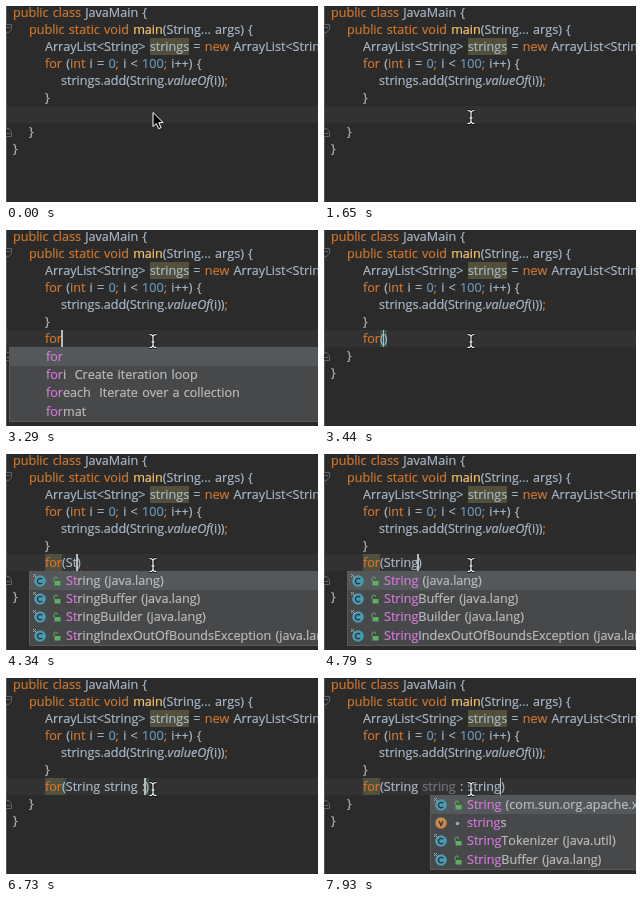
An HTML page for the animation above (8 s loop, 312 by 196 pixels).

```html
<!DOCTYPE html>
<html lang="en">
<head>
<meta charset="utf-8">
<title>Code completion</title>
<style>
  html, body { margin: 0; width: 100%; height: 100%; overflow: hidden; background: #2b2b2b; }
  #stage {
    position: relative; width: 312px; height: 196px; overflow: hidden;
    background: #2b2b2b; color: #a9b7c6;
    font: 12.6px/17px "Open Sans", "Noto Sans", sans-serif;
    word-spacing: .95px; font-kerning: none; -webkit-text-stroke: .2px;
  }
  #stage > * { position: absolute; left: 0; top: 0; }
  .line { position: absolute; height: 17px; white-space: pre; }
  #stage > #edit { left: 39px; top: 100px; }
  .kw { color: #cc7832; }
  .num { color: #6897bb; }
  .fn { color: #ffc66d; }
  .warn { background: #52503a; display: inline-block; height: 17px; }
  .pair { background: #3b514d; }
  .unused { color: #72737a; }
  .error { text-decoration: underline wavy #bc3f3c 1px; text-underline-offset: 1px; }
  #stage > .row { top: 100px; width: 312px; height: 17px; background: #323232; }
  .caret { display: inline-block; position: relative; width: 0; height: 17px; vertical-align: top; }
  .caret::after { content: ""; position: absolute; left: -1px; top: 0; width: 1.5px; height: 17px; background: #bbb; }
  #stage > #popup {
    top: 117px; width: 330px; box-sizing: border-box; white-space: pre;
    background: #46484a; color: #bbb; border: 1px solid #565a5c;
  }
  .item { position: relative; height: 18.2px; line-height: 18.2px; }
  .item:first-child { background: #55585a; }
  .item svg { position: absolute; left: 2px; top: 1px; }
  .item span { position: absolute; top: 0; }
  .item b { font-weight: 400; color: #d17ad6; }
  .hint { background: #3c3f41; font-size: 11.7px; line-height: 15px; height: 15px; word-spacing: 0; }
  #stage > #arrow { left: 145px; top: 105px; }
  #stage > #beam { left: 141px; top: 102px; }
</style>
</head>
<body>
<div id="stage">
  <div class="row"></div>
  <svg width="8" height="196" fill="#2b2b2b" stroke="#606366">
    <path d="M.5 0v196" stroke="#555"/>
    <path d="M-1.5 18.5h7v5l-3.5 3.5l-3.5 -3.5z M0 21.5h4"/>
    <path d="M-1.5 130.5h7v-5l-3.5 -3.5l-3.5 3.5z M0 127.5h4"/>
  </svg>
  <div id="code"></div>
  <div id="edit" class="line"></div>
  <div id="popup"></div>
  <svg id="arrow" width="14" height="20">
    <path d="M2 1.5v14l3.3 -3l2.3 5.2l2.5 -1.1l-2.3 -5h4.4z" fill="#000" stroke="#fff"/>
  </svg>
  <svg id="beam" width="12" height="18" fill="none">
    <path id="bar" d="M2.5 2.5q3.5 0 3.5 2.5q0 -2.5 3.5 -2.5M6 5v8M2.5 15.5q3.5 0 3.5 -2.5q0 2.5 3.5 2.5M4.5 10h3" stroke="#111" stroke-width="2.6"/>
    <use href="#bar" style="stroke:#fff"/>
    <path d="M2.5 2.5q3.5 0 3.5 2.5q0 -2.5 3.5 -2.5M6 5v8M2.5 15.5q3.5 0 3.5 -2.5q0 2.5 3.5 2.5M4.5 10h3" stroke="#fff" stroke-width="1.2"/>
  </svg>
</div>
<script>
const LOOP = 8000;
const $ = id => document.getElementById(id);
const esc = s => s.replace(/&/g, "&amp;").replace(/</g, "&lt;");
const tag = (cls, s) => `<span class="${cls}">${s}</span>`;

// Code lines: [row, indent level, text]; ~k word~ marks a styled token.
const styles = { k: "kw", n: "num", f: "fn", w: "warn" };
const paint = s => esc(s).replace(/~(\w) (.*?)~/g, (_, k, word) =>
  k === "i" ? `<i>${word}</i>` : tag(styles[k], word));
const lines = [
  [0, 0, "~k public class~ JavaMain {"],
  [1, 1, "~k public static void~ ~f main~(String... args) {"],
  [2, 2, "ArrayList<String> ~w strings~ = ~k new~ ArrayList<String>();"],
  [3, 2, "~k for~ (~k int~ i = ~n 0~~k ;~ i < ~n 100~~k ;~ i++) {"],
  [4, 3, "strings.add(String.~i valueOf~(i))~k ;~"],
  [5, 2, "}"],
  [7, 1, "}"],
  [8, 0, "}"]
];
$("code").innerHTML = lines.map(([row, level, text]) =>
  `<div class="line" style="left:${7 + 16 * level}px;top:${17 * row - 2}px">${paint(text)}</div>`
).join("");

// Popups: left edge and items [icon kind, name, detail]
const popups = {
  loop: { x: 3, items: [["", "for", ""], ["", "fori", "  Create iteration loop"],
    ["", "foreach", "  Iterate over a collection"], ["", "format", ""]] },
  type: { x: 23, items: [["c", "String", " (java.lang)"], ["c", "StringBuffer", " (java.lang)"],
    ["c", "StringBuilder", " (java.lang)"], ["c", "StringIndexOutOfBoundsException", " (java.lang)"]] },
  name: { x: 89, pad: 8, items: [["", "string", ""]],
    hint: "Press ^. to choose the selected (or first) suggestion" },
  value: { x: 106, items: [["c", "String", " (com.sun.org.apache.xpath)"], ["v", "strings", ""],
    ["c", "StringTokenizer", " (java.util)"], ["c", "StringBuffer", " (java.lang)"]] }
};

function icon(kind) {
  if (!kind) return "";
  const isClass = kind === "c";
  const mark = isClass
    ? `<path d="M10.2 6.3a2.7 2.7 0 1 0 0 3.6" stroke="#263238" stroke-width="1.3" fill="none"/>
       <path d="M1 1l4 4M1 4l3 -3" stroke="#9aa7b0"/>
       <path d="M22 8v-2.2a1.8 1.8 0 0 1 3.6 0" stroke="#5faf62" fill="none"/>
       <rect x="22.5" y="8" width="6" height="4.5" fill="#5faf62"/>`
    : `<path d="M6 6l2 4.5l2 -4.5" stroke="#3a2d20" stroke-width="1.3" fill="none"/>
       <circle cx="24.5" cy="8.5" r="1.8" fill="#9aa7b0"/>`;
  return `<svg width="32" height="16"><circle cx="8" cy="8" r="5.8" fill="${isClass ? "#4b9ab3" : "#c68a50"}"/>${mark}</svg>`;
}

function popupHtml({ items, pad = 36, hint }, n) {
  const rows = items.map(([kind, name, detail]) =>
    `<div class="item">${icon(kind)}<span style="left:${pad}px"><b>${name.slice(0, n)}</b>${name.slice(n)}${detail}</span></div>`);
  if (hint) rows.push(`<div class="hint">${hint}</div>`);
  return rows.join("");
}

// Steps: [ms, typed text, popup, matched prefix length]
const steps = [
  [0, ""], [2700, "f"], [2840, "fo"], [2990, "for"],
  [3140, "for", "loop", 3], [3290, "for", "loop", 3], [3440, "for("],
  [4190, "for(S", "type", 1], [4340, "for(St", "type", 2], [4490, "for(Str", "type", 3],
  [4640, "for(Stri", "type", 4], [4790, "for(String", "type", 6], [4940, "for(String "],
  [5240, "for(String s", "name", 1], [5390, "for(String str", "name", 3],
  [6140, "for(String string"], [6430, "for(String string "], [6730, "for(String string :"],
  [6880, "for(String string : "],
  ...[..."string"].map((_, i) =>
    [7180 + 150 * i, "for(String string : " + "string".slice(0, i + 1), "value", i + 1])
];
const within = (t, spans) => spans.some(([a, b]) => t >= a && t < b);
const caretOn = [[750, 1650], [2250, LOOP]];
const paired = [[3440, 4190], [4940, 5240], [6430, 7180]];
const faulty = [[3740, 6430]];

function editHtml(text, t) {
  const caret = within(t, caretOn) ? tag("caret", "") : "";
  const pair = within(t, paired) ? "pair" : "";
  let html = text;
  if (text.startsWith("for")) {
    let rest = text.slice(3);
    if (t >= 7180) rest = rest.replace(" string", " " + tag("unused", "string"));
    if (rest[0] === "(") rest = tag(pair, "(") + rest.slice(1);
    html = tag(t >= 3740 ? "kw warn" : "kw", "for") + rest;
  }
  const close = text.includes("(")
    ? tag(pair + (within(t, faulty) ? " error" : ""), ")") : "";
  return html + caret + close;
}

const shown = {};
function put(id, html) {
  if (shown[id] !== html) $(id).innerHTML = shown[id] = html;
}

function draw(t) {
  const [, text, name, n] = steps.filter(s => s[0] <= t).pop();
  put("edit", editHtml(text, t));
  const list = popups[name];
  $("popup").style.display = list ? "block" : "none";
  if (list) {
    $("popup").style.left = list.x + "px";
    put("popup", popupHtml(list, n));
  }
  $("arrow").style.display = t < 750 ? "block" : "none";
  $("beam").style.display = t < 750 ? "none" : "block";
}

const start = performance.now();
function tick() {
  draw((performance.now() - start) % LOOP);
  requestAnimationFrame(tick);
}
tick();
</script>
</body>
</html>
```
